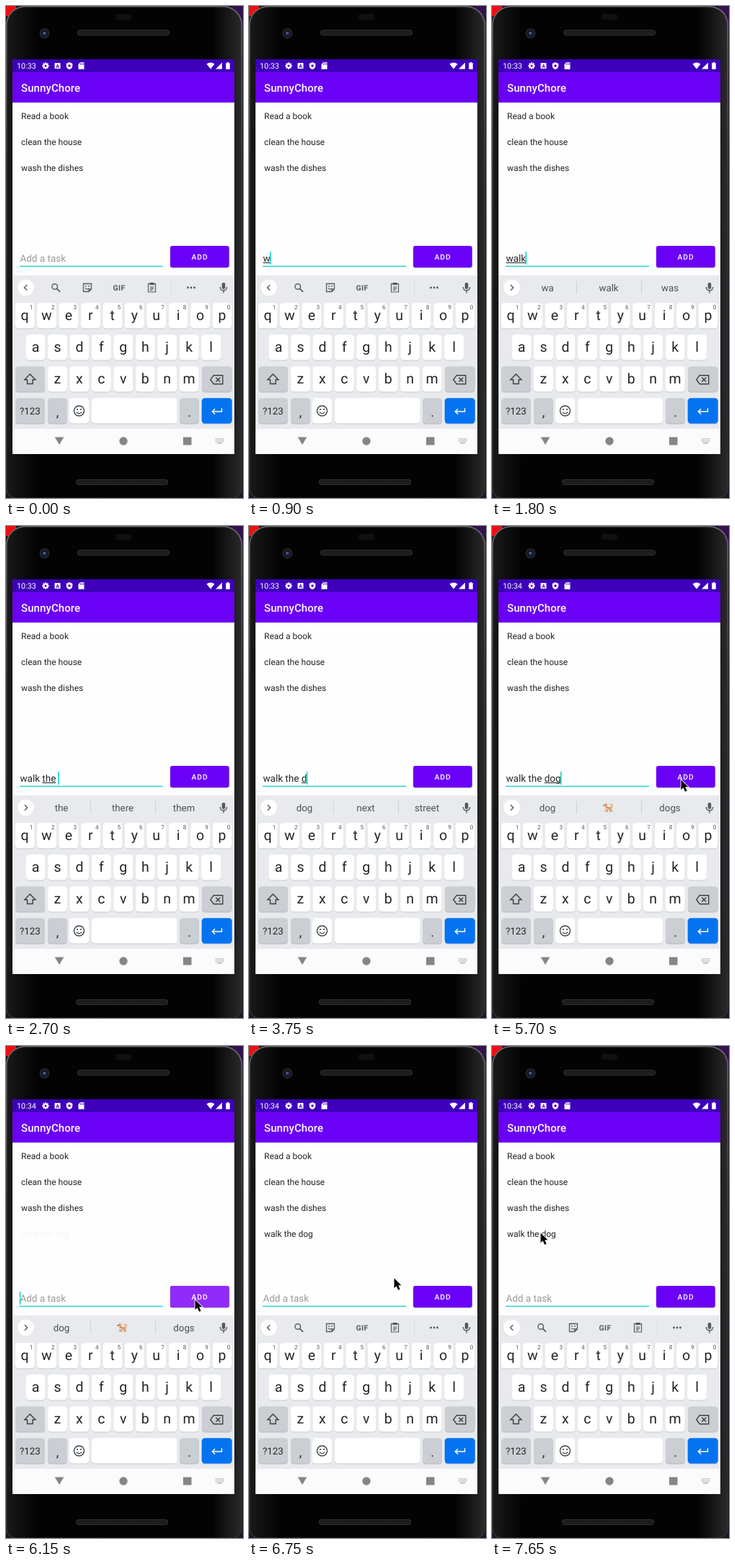
Recreate the animation shown at these times as an HTML page with a canvas. Size 329 px wide and 683 px high, loop 8 s.

```html
<!DOCTYPE html>
<html lang="en">
<head>
<meta charset="utf-8">
<title>To-do list demo</title>
<style>
html, body { margin: 0; width: 100%; height: 100%; overflow: hidden; background: #000; }
canvas { display: block; width: 329px; height: 683px; }
</style>
</head>
<body>
<canvas id="stage"></canvas>
<script>
const W = 329, H = 683, LOOP = 8000;
const canvas = document.getElementById('stage');
const ratio = window.devicePixelRatio || 1;
canvas.width = W * ratio;
canvas.height = H * ratio;
const c = canvas.getContext('2d');
c.scale(ratio, ratio);
c.textRendering = 'geometricPrecision';

const FONT = 'Roboto, sans-serif';
const PURPLE = '#6b00f7', TEAL = '#12d5c4', INK = '#242528', ICON = '#55595f';

// Each step patches the state left by the one before it.
const steps = [
  [0, { clock: '10:33', text: '', from: 0, to: 0, caret: false, words: null, pointer: null, ripple: 0, row: 0 }],
  [450, { caret: true }],
  [900, { text: 'w', to: 1 }],
  [1200, { text: 'wa', to: 2, words: ['w', 'was', 'would'] }],
  [1500, { words: ['wa', 'walk', 'was'] }],
  [1650, { text: 'wal', to: 3 }],
  [1800, { text: 'walk', to: 4 }],
  [1950, { words: ['walk', 'walking', 'walks'] }],
  [2100, { text: 'walk ' }],
  [2250, { text: 'walk t', from: 5, to: 6, words: ['to', 'the', 'around'] }],
  [2550, { text: 'walk the', to: 8, words: ['the', 'to', 'this'] }],
  [2700, { text: 'walk the ', words: ['the', 'there', 'them'] }],
  [3000, { from: 0, to: 0, words: ['dog', 'next', 'street'] }],
  [3450, { caret: false }],
  [3750, { text: 'walk the d', from: 9, to: 10, caret: true }],
  [4050, { clock: '10:34', words: ['do', 'day', 'down'] }],
  [4200, { text: 'walk the do', to: 11 }],
  [4350, { words: ['do', 'dogs', 'dog'] }],
  [4500, { text: 'walk the dog', to: 12 }],
  [4800, { words: ['dog', null, 'dogs'] }],
  [5250, { caret: false }],
  [5400, { pointer: [311, 431] }],
  [5550, { caret: true, pointer: [279, 381] }],
  [5700, { pointer: [262, 352] }],
  [6000, { caret: false, ripple: 0.5 }],
  [6150, { text: '', from: 0, to: 0, caret: true, ripple: 1, row: 0.035 }],
  [6300, { words: null, ripple: 0, row: 1 }],
  [6600, { pointer: [252, 347] }],
  [6750, { pointer: [201, 322], caret: false }],
  [6900, { pointer: [132, 289] }],
  [7050, { pointer: [86, 268] }],
  [7200, { pointer: [68, 261], caret: true }],
  [7500, { pointer: [67, 260] }],
  [7650, { pointer: [67, 259], caret: false }]
];

function stateAt(t) {
  return Object.assign({}, ...steps.filter(s => s[0] <= t).map(s => s[1]));
}

function rect(x, y, w, h, color) {
  c.fillStyle = color;
  c.fillRect(x, y, w, h);
}
function round(x, y, w, h, r, color) {
  c.fillStyle = color;
  c.beginPath();
  c.roundRect(x, y, w, h, r);
  c.fill();
}
function disc(x, y, r, color) {
  c.fillStyle = color;
  c.beginPath();
  c.arc(x, y, r, 0, Math.PI * 2);
  c.fill();
}
function ring(x, y, r, color, width = 1.2) {
  c.strokeStyle = color;
  c.lineWidth = width;
  c.beginPath();
  c.arc(x, y, r, 0, Math.PI * 2);
  c.stroke();
}
function shape(x, y, d, color) {
  c.save();
  c.translate(x, y);
  c.fillStyle = color;
  c.fill(new Path2D(d));
  c.restore();
}
function line(x, y, d, color, width = 1.3) {
  c.save();
  c.translate(x, y);
  c.strokeStyle = color;
  c.lineWidth = width;
  c.stroke(new Path2D(d));
  c.restore();
}
function text(str, x, y, size, color, { weight = 400, align = 'left', spacing = 0 } = {}) {
  c.font = `${weight} ${size}px ${FONT}`;
  c.letterSpacing = spacing + 'px';
  c.textAlign = align;
  c.fillStyle = color;
  c.fillText(str, x, y);
  c.letterSpacing = '0px';
}
function fade(x0, y0, x1, y1, ...colors) {
  const g = c.createLinearGradient(x0, y0, x1, y1);
  colors.forEach((color, i) => g.addColorStop(i / (colors.length - 1), color));
  return g;
}

function grille(x, y) {
  round(x, y, 128, 8, 4, '#303030');
  round(x + 1, y + 1, 126, 6, 3, '#1b1b1b');
  for (let i = 4; i < 124; i += 3) rect(x + i, y + 3, 1, 2, '#252525');
}

function drawPhone() {
  rect(0, 0, W, H, '#1d1228');
  rect(0, 0, 14, 14, '#f20d12');
  rect(314, 0, 15, 30, '#35104f');
  round(0, 0, 328, 684, [26, 26, 14, 14], fade(0, 0, 0, H, '#6a6a6a', '#3c3c3c', '#2c2c2c', '#303030'));
  round(1.5, 1.5, 325, 681, [25, 25, 13, 13], fade(1, 0, 327, 0, '#1a1a1a', '#030303', '#030303',
    '#030303', '#030303', '#030303', '#030303', '#030303', '#2a2a2a'));
  round(152, 11, 22, 8, 3, '#101013');
  grille(99, 33);
  grille(97, 657);
  disc(53.5, 38, 7, '#24262c');
  disc(53.5, 38, 5, '#10131f');
  disc(53.5, 38, 2.6, '#303c70');
  disc(52.7, 37.2, 1, '#6d7bb5');
}

function drawStatus(clock) {
  rect(9, 74, 308, 18, '#3e00ba');
  text(clock, 15, 87, 10.8, '#fff');
  for (let i = 0; i < 4; i++) {
    c.save();
    c.translate(55, 83);
    c.rotate(i * Math.PI / 4);
    rect(-1, -4.7, 2, 9.4, '#fff');
    c.restore();
  }
  disc(55, 83, 3.5, '#fff');
  disc(55, 83, 1.5, '#3e00ba');
  round(67.5, 79, 8, 8, 1, '#fff');
  text('A', 71.5, 85.8, 7, '#3e00ba', { weight: 700, align: 'center' });
  shape(88, 83, 'M0-5 4.3-3V0Q4 3.8 0 5Q-4 3.8-4.3 0V-3Z', '#fff');
  disc(88, 83, 1.7, '#3e00ba');
  shape(104.5, 83, 'M-1.5-4.7H4V4.7H-4V-2Z', '#fff');
  for (let i = 0; i < 3; i++) rect(103 + i * 2, 79.5, 1, 2, '#3e00ba');
  shape(284, 83, 'M-5.5-2.4Q0-6.4 5.5-2.4L0 4.6Z', '#fff');
  shape(296, 83, 'M4-4.5V4.5H-5Z', '#fff');
  round(305.2, 79, 5.6, 8.8, 0.7, '#fff');
  rect(306.8, 78, 2.4, 1.5, '#fff');
}

function drawApp(s) {
  rect(9, 92, 308, 282, '#fefefe');
  rect(9, 92, 308, 42, PURPLE);
  text('SunnyChore', 21, 119, 15, '#fff', { weight: 500, spacing: 0.1 });
  ['Read a book', 'clean the house', 'wash the dishes'].forEach((item, i) =>
    text(item, 21, 156.6 + i * 36, 12, INK));
  c.globalAlpha = s.row;
  text('walk the dog', 21, 264.6, 12, INK);
  c.globalAlpha = 1;
  drawInput(s);
  drawButton(s.ripple);
}

function drawInput({ text: str, from, to, caret }) {
  const x = 19.4;
  rect(19, 360.7, 199, 1.3, TEAL);
  if (str) text(str, x, 355, 13.5, INK);
  else text('Add a task', x, 355, 13.5, '#9a9a9a');
  c.font = `13.5px ${FONT}`;
  const at = n => x + c.measureText(str.slice(0, n)).width;
  if (to > from) rect(at(from), 356, at(to) - at(from), 1, INK);
  if (caret) rect(at(str.length) - 0.6, 341, 1.6, 18, TEAL);
}

function drawButton(ripple) {
  c.save();
  c.shadowColor = 'rgba(0,0,0,.3)';
  c.shadowBlur = 1.5 * ratio;
  c.shadowOffsetY = 0.7 * ratio;
  round(228, 333, 81.7, 30, 3, PURPLE);
  c.restore();
  if (ripple) {
    c.save();
    c.beginPath();
    c.roundRect(228, 333, 81.7, 30, 3);
    c.clip();
    disc(264, 352, ripple * 55, '#912bf9');
    c.restore();
  }
  text('ADD', 257.6, 352.2, 10.3, '#fff', { weight: 500, spacing: 0.9 });
}

function drawDog(x, y) {
  line(x, y, 'M3.6 0Q7.5-1 5.3-4Q4-5 3-3.6', '#e2a673', 1.6);
  line(x, y, 'M-2.5 1-3 6M-.8 2V6M3 1.5 2.6 6M4.3 0 5 6', '#d9965f', 1.5);
  shape(x, y, 'M-3.6-2Q0-.6 4-1Q5.6 0 4.6 2.6Q1 3-2.6 2.6Z', '#e0a06a');
  shape(x, y, 'M-3.6-1-1 0Q-.6 2.6-2.2 3Q-3.6 1.6-3.6-1Z', '#f3ddc8');
  shape(x, y, 'M-6.3-3.4-4.4-5-3.6-6.8-2.4-5-.8-6.4-1-2-3.4-.4-6-1.6Z', '#e3a470');
  shape(x, y, 'M-6.2-2.6-3.6-2.4-2.6-1-4-.4-6-1.4Z', '#f5e2d0');
  line(x, y, 'M-3.4 0-.9-.6', '#cf4a43', 1);
  disc(x - 4, y - 3.4, 0.6, '#333');
  disc(x - 6, y - 2.6, 0.6, '#333');
}

function drawMic() {
  round(299.7, 384, 4.6, 9, 2.3, ICON);
  line(302, 391, 'M-4.7-1Q-4.5 4 0 4Q4.5 4 4.7-1M0 4V7.4', ICON, 1.4);
}

function drawTools() {
  ring(67.7, 389.5, 3.8, ICON, 1.4);
  line(68, 390, 'M2.5 2.3 7 6.8', ICON, 1.7);
  line(113, 391, 'M-5.5-5.5H5.5V2L2 5.5H-5.5ZM5.5 2H2V5.5M-3 .5Q-1 3.5 2 1', ICON, 1.3);
  disc(111, 389, 0.9, ICON);
  disc(115, 389, 0.9, ICON);
  text('GIF', 157, 394.7, 10.5, ICON, { weight: 700, align: 'center', spacing: 0.4 });
  line(202.5, 391, 'M-5-5.3H5V6H-5ZM-2.6-1H2.6M-2.6 1.2H2.6M-2.6 3.4H1', ICON, 1.2);
  rect(199.5, 384, 6, 3.2, ICON);
  rect(229, 383, 1, 17, '#d5d7db');
  for (const x of [252.5, 257, 261.5]) disc(x, 391, 1.4, ICON);
}

function drawStrip(words) {
  disc(27.5, 391.5, 11.7, '#d5d7da');
  disc(27.5, 391, 11.5, '#fff');
  line(27.5, 391, words ? 'M-1.7-3.8 2.1 0-1.7 3.8' : 'M1.7-3.8-2.1 0 1.7 3.8', ICON, 1.4);
  drawMic();
  if (!words) return drawTools();
  rect(117, 382, 1, 18, '#ced0d4');
  rect(207, 382, 1, 18, '#ced0d4');
  words.forEach((word, i) => {
    const x = 77 + i * 85;
    if (word) text(word, x, 396, 13.3, '#4c4f54', { align: 'center' });
    else drawDog(x - 1, 391);
  });
}

function key(x, y, w, color = '#fff', edge = '#c6c8cc') {
  round(x, y + 1, w, 35.6, 4.5, edge);
  round(x, y + 0.3, w, 35.2, 4.5, color);
}

function letters(str, x0, y, numbered) {
  [...str].forEach((ch, i) => {
    const x = x0 + i * 30.45;
    key(x - 13.5, y, 27);
    text(ch, x, y + 24.3, 19.5, INK, { align: 'center' });
    if (numbered) text((i + 1) % 10, x + 9, y + 9, 8.3, '#55585d', { align: 'center' });
  });
}

function drawKeys() {
  const GREY = '#cbced3', EDGE = '#b5b8bd', DARK = '#3c4043';
  letters('qwertyuiop', 26, 412, true);
  letters('asdfghjkl', 41, 456);
  letters('zxcvbnm', 71.4, 500);
  key(13, 500, 41, GREY, EDGE);
  line(33.3, 518, 'M0-7 7.5 .8H3.8V6.5H-3.8V.8H-7.5Z', DARK, 1.4);
  key(272, 500, 41.5, GREY, EDGE);
  line(292.3, 518.7, 'M-4-6H8.5V6H-4L-8.5 0ZM-1-3 5 3M5-3-1 3', DARK, 1.4);
  key(13, 544, 41, GREY, EDGE);
  text('?123', 33.3, 567, 13.3, INK, { align: 'center' });
  key(58, 544, 27, GREY, EDGE);
  text(',', 71.5, 570, 18, INK, { align: 'center' });
  key(88, 544, 27);
  ring(101.5, 562, 7, DARK, 1.4);
  disc(99, 560, 1.1, DARK);
  disc(104, 560, 1.1, DARK);
  line(101.5, 562, 'M-3.7 1.6Q0 5.8 3.7 1.6', DARK, 1.3);
  key(119, 544, 118.5);
  key(241, 544, 27, GREY, EDGE);
  text('.', 254.5, 570, 18, INK, { align: 'center' });
  key(271.7, 544, 42, '#0573f0', '#9dbbe2');
  line(292.7, 562, 'M6.8-3.8V1H-6M-2.6-2.8-6.4 1-2.6 4.8', '#fff', 1.4);
}

function drawNav() {
  rect(9, 587, 308, 35, '#fbfbfb');
  shape(74, 603.5, 'M-6.3-5H6.3L0 5.5Z', '#858585');
  disc(163, 604, 5.7, '#858585');
  rect(246, 598.5, 11.5, 11, '#858585');
  for (let row = 0; row < 3; row++)
    for (let col = 0; col < 6; col++) rect(291 + col * 2, 600 + row * 2, 1.1, 1.1, '#9a9a9a');
  rect(293, 606.2, 7, 1.1, '#9a9a9a');
}

function drawPointer([x, y]) {
  const arrow = 'M.5 .5V14.2L3.6 11.3 6 16.8 8.6 15.7 6.2 10.3H10.4Z';
  line(x, y, arrow, '#fff', 1.8);
  shape(x, y, arrow, '#000');
}

function draw(t) {
  const s = stateAt(t);
  drawPhone();
  drawApp(s);
  drawStatus(s.clock);
  rect(9, 374, 308, 213, '#e8eaed');
  drawStrip(s.words);
  drawKeys();
  drawNav();
  if (s.pointer) drawPointer(s.pointer);
}

const start = performance.now();
function tick() {
  draw((performance.now() - start) % LOOP);
  requestAnimationFrame(tick);
}
tick();
</script>
</body>
</html>
```
